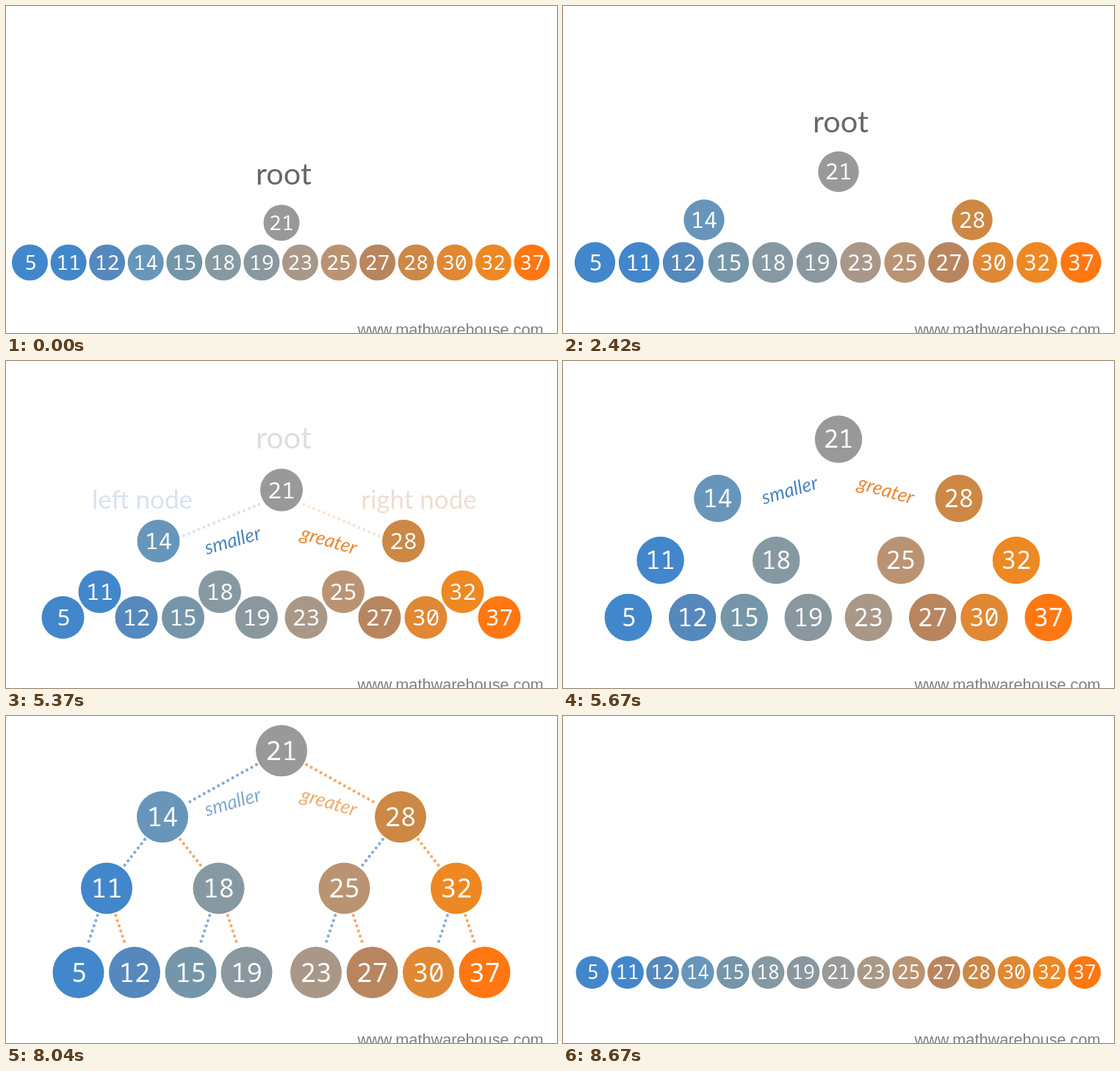
An HTML page for the animation above (8830 ms loop, 750x445 px).

```html
<!DOCTYPE html>
<html lang="en">
<head>
<meta charset="utf-8">
<title>Binary search tree</title>
<style>
  html, body { margin: 0; width: 100%; height: 100%; overflow: hidden; background: #fff; }
  svg { display: block; width: 750px; height: 445px; }
  text { text-anchor: middle; font-family: Lato, "Open Sans", sans-serif; }
  .num { fill: #fafafa; font-family: "Noto Sans Mono", "DejaVu Sans Mono", monospace; font-weight: 500; }
  .edge { fill: none; stroke-width: 4.3; stroke-linecap: round; stroke-dasharray: 0 7.4; }
  .tag { font-size: 26.4px; font-style: italic; }
  .label { font-size: 35px; }
  .root { font-size: 41.5px; fill: #67686b; }
  .site { font: 21.7px "Liberation Sans", Arial, sans-serif; fill: #808080; }
</style>
</head>
<body>
<svg viewBox="0 0 750 445"></svg>
<script>
const LOOP = 8830;
const BLUE = '#5289c4', ORANGE = '#f0862a';
const svg = document.querySelector('svg');

function add(name, attrs, text = '') {
  const el = document.createElementNS('http://www.w3.org/2000/svg', name);
  set(el, attrs);
  el.textContent = text;
  svg.append(el);
  return el;
}
function set(el, attrs) {
  for (const key in attrs) el.setAttribute(key, attrs[key]);
}

const values = [5, 11, 12, 14, 15, 18, 19, 21, 23, 25, 27, 28, 30, 32, 37];
const colors = ['#4287cb', '#4287cb', '#5588bd', '#6796ba', '#7596a8', '#8699a2', '#8a979f', '#999',
  '#a99888', '#ba9472', '#b9855f', '#cc8844', '#e08833', '#ee8822', '#ff7711'];
const level = i => i === 7 ? 0 : i % 4 === 3 ? 1 : i % 2 ? 2 : 3;

// Poses: radius, x of every node, y of every tree level
const poses = {
  start: {
    r: 24.5, y: [295, 349, 349, 349],
    x: values.map((v, i) => i === 7 ? 375 : 32.5 + 52.57 * (i < 7 ? i : i - 1))
  },
  lifted: {
    r: 27.7, y: [225.5, 291, 349, 349],
    x: [43.5, 103.5, 163.5, 192, 225.5, 285.5, 345.5, 375, 405, 465, 525, 557, 585.5, 645, 705]
  },
  split: {
    r: 28.5, y: [223, 289, 349, 349],
    x: [40, 100, 161, 189.5, 223.5, 284, 345, 375, 406, 466, 527, 559, 588, 649, 709.5]
  },
  zigzag: {
    r: 29, y: [175.5, 245, 314, 349],
    x: [77.5, 127.5, 177.5, 207.5, 241, 291, 341, 375, 408.5, 459, 508.5, 541, 571.5, 621.5, 671.5]
  },
  tree: {
    r: 35, y: [47.3, 137.3, 234.5, 349],
    x: [98.5, 137, 175, 213, 251.5, 289.5, 327.5, 375, 422, 460.5, 498.5, 537, 575, 613, 651.5]
  },
  row: {
    r: 22.3, y: [349, 349, 349, 349],
    x: values.map((v, i) => 39.8 + 47.86 * i)
  }
};

// Tracks are lists of [step, value]
const poseTrack = [[0, poses.start], [17, poses.lifted], [22, poses.split], [26, poses.zigzag],
  [39, poses.tree], [42, poses.tree], [55, poses.row]];
const rootY = [[0, 243], [17, 172], [22, 167], [26, 119]];
const labelY = [[22, 236], [26, 201]];
const tagY = [[22, 285], [26, 246], [39, 119]];
const topEdgeDrop = [[22, 3.5], [26, 7], [34, 0]];
const labelFade = [[22, 1], [26, 0.22], [27, 0]];
const tagFade = [[39, 1], [40, 0.7], [43, 0]];
const lowEdgeFade = [[34, 0], [39, 1], ...tagFade.slice(1)];
const topEdgeFade = [[17, 0], [22, 1], ...labelFade.slice(1), ...lowEdgeFade];

const mix = (a, b, u) => a + (b - a) * u;
const blend = (a, b, u) => ({
  r: mix(a.r, b.r, u),
  x: a.x.map((v, i) => mix(v, b.x[i], u)),
  y: a.y.map((v, i) => mix(v, b.y[i], u))
});
function at(track, k, join = mix) {
  const n = track.findIndex(key => key[0] >= k);
  if (n < 0) return track[track.length - 1][1];
  if (n === 0) return track[0][1];
  const [k0, a] = track[n - 1], [k1, b] = track[n];
  return join(a, b, (k - k0) / (k1 - k0));
}
// Number of steps taken, the first at time a and the n-th at time b
const steps = (t, a, b, n) =>
  t < a ? 0 : Math.min(n, Math.floor((t - a) / (b - a) * (n - 1) + 0.3) + 1);

const edges = [];
values.forEach((v, i) => {
  const depth = level(i);
  if (depth === 3) return;
  const reach = 4 >> depth;
  for (const side of [-1, 1]) {
    edges.push({
      from: i, to: i + side * reach, depth,
      el: add('line', { class: 'edge', stroke: side < 0 ? BLUE : ORANGE })
    });
  }
});

const nodes = values.map((v, i) => ({
  disc: add('circle', { fill: colors[i] }),
  num: add('text', { class: 'num' }, v)
}));

const root = add('text', { class: 'root', x: 378 }, 'root');
const labels = [
  add('text', { class: 'label', x: 185.5, fill: '#4681bd' }, 'left node'),
  add('text', { class: 'label', x: 562, fill: '#b56a32' }, 'right node')
];
const tags = [
  { x: 309, turn: -16, el: add('text', { class: 'tag', y: 7, fill: '#4c86c0' }, 'smaller') },
  { x: 439, turn: 16, el: add('text', { class: 'tag', y: 7, fill: '#ec862e' }, 'greater') }
];
add('text', { class: 'site', x: 605, y: 447.5 }, 'www.mathwarehouse.com');

function draw(t) {
  const k = steps(t, 1750, 2620, 22) + steps(t, 5250, 5920, 17) + steps(t, 8040, 8670, 16);
  const { r, x, y } = at(poseTrack, k, blend);
  const nodeY = i => y[level(i)];
  const size = 10 + 0.74 * r;

  nodes.forEach(({ disc, num }, i) => {
    set(disc, { cx: x[i], cy: nodeY(i), r });
    set(num, { x: x[i] + (i ? 0 : 1.2), y: nodeY(i) + size * 0.35, 'font-size': size });
  });

  for (const { from, to, depth, el } of edges) {
    const dx = x[to] - x[from], dy = nodeY(to) - nodeY(from);
    const len = Math.hypot(dx, dy) || 1;
    const gx = dx / len * (r + 4), gy = dy / len * (r + 4);
    const drop = depth ? 0 : at(topEdgeDrop, k);
    set(el, {
      x1: x[from] + gx, y1: nodeY(from) + gy + drop,
      x2: x[to] - gx, y2: nodeY(to) - gy + drop,
      opacity: at(depth ? lowEdgeFade : topEdgeFade, k)
    });
  }

  const fade = at(labelFade, k);
  set(root, { y: at(rootY, k), opacity: fade });
  const labelIn = steps(t, 2670, 3080, 11) / 11;
  for (const el of labels) set(el, { y: at(labelY, k), opacity: labelIn * fade });

  const tagIn = steps(t, 3870, 4000, 4) / 4;
  for (const { x: tx, turn, el } of tags) {
    set(el, {
      transform: `translate(${tx} ${at(tagY, k)}) rotate(${turn})`,
      opacity: tagIn * at(tagFade, k)
    });
  }
}

const begin = performance.now();
function tick() {
  draw((performance.now() - begin) % LOOP);
  requestAnimationFrame(tick);
}
tick();
</script>
</body>
</html>
```
